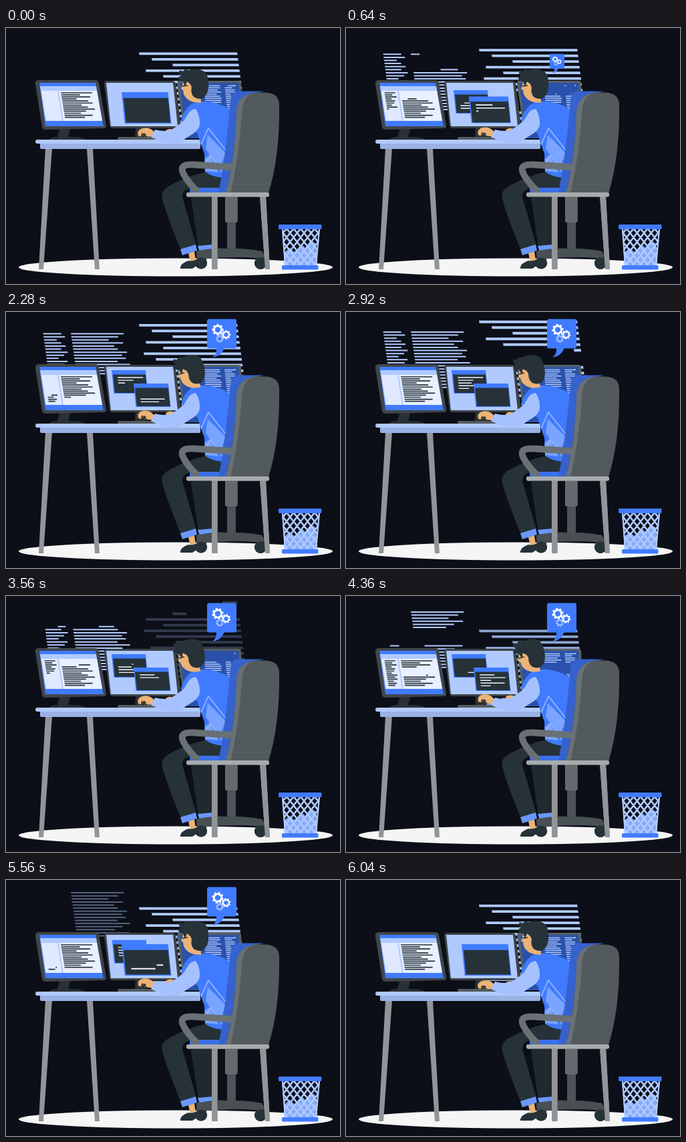
An HTML page with a canvas that plays this animation: 500 px wide and 383 px high, repeating every 6.08 s.

```html
<!DOCTYPE html>
<html lang="en">
<head>
<meta charset="utf-8">
<title>Developer at work</title>
<style>
html, body { margin: 0; width: 100%; height: 100%; overflow: hidden; background: #0c0f17; }
canvas { display: block; width: 500px; height: 383px; }
</style>
</head>
<body>
<canvas id="stage" width="500" height="383"></canvas>
<script>
const ctx = document.getElementById('stage').getContext('2d');
const LOOP = 6080, HALF = 3040, TAU = Math.PI * 2;
const BG = '#0c0f17', BLUE = '#407bff', PALE = '#b0caff', INK = '#263238', SKIN = '#ebb376';

const clamp = v => Math.max(0, Math.min(1, v));
const ramp = (t, a, b) => clamp((t - a) / (b - a));
const ease = (t, a, b) => { const k = ramp(t, a, b); return k * k * (3 - 2 * k); };
const mix = (a, b, k) => a + (b - a) * k;

function shape(d, fill) { ctx.fillStyle = fill; ctx.fill(new Path2D(d)); }
function rect(x, y, w, h, fill, r = 0) {
  ctx.fillStyle = fill;
  ctx.beginPath();
  ctx.roundRect(x, y, w, h, r);
  ctx.fill();
}
function disc(x, y, rx, ry, fill) {
  ctx.fillStyle = fill;
  ctx.beginPath();
  ctx.ellipse(x, y, rx, ry, 0, 0, TAU);
  ctx.fill();
}
function line(d, stroke, width) {
  ctx.strokeStyle = stroke;
  ctx.lineWidth = width;
  ctx.stroke(new Path2D(d));
}

// One slanted row of code: [0, typed] and [erased, 1] stay visible.
function codeRow(x, y, len, h, typed, erased, fill) {
  const slant = h * 0.2;
  const part = (a, b) => {
    if (b - a < 0.01) return;
    const l = x + len * a, r = x + len * b;
    ctx.beginPath();
    ctx.moveTo(l, y - h / 2);
    ctx.lineTo(r, y - h / 2);
    ctx.lineTo(r + slant, y + h / 2);
    ctx.lineTo(l + slant, y + h / 2);
    ctx.fill();
  };
  ctx.fillStyle = fill;
  if (typed >= erased) part(0, 1);
  else { part(0, typed); part(erased, 1); }
}

// Rows with a gap running downward between the typing and erasing rows.
function codeBlock(o) {
  for (let i = 0; i < o.n; i++) {
    codeRow(o.x + o.dx * i, o.y + o.dy * i, o.len[i % o.len.length], o.h,
      clamp(o.typed - i), clamp(o.erased - i), o.fill);
  }
}

const WIDE = [199, 218, 249, 209, 235, 206, 224, 254, 216, 228, 241, 212, 233, 205];
function rightCode(t) {
  const y = 38.4 - 0.0081 * (t < 3880 ? t : t - LOOP);
  const late = t > 2500;
  const typed = late ? 2.79 - (t - 3560) / 130 : 6 - (t - 1320) / 130;
  const erased = typed - 2.64;
  const idle = t > 3880;
  ctx.globalAlpha = idle ? ramp(t, 4040, 4440) : 1 - ramp(t, 3040, 3720);
  WIDE.forEach((x, i) => {
    codeRow(x, y + 8.5 * i, 346 + 1.1 * i - x, 3.8,
      idle ? 1 : clamp(i + 1 - typed), idle ? 1 : clamp(i + 1 - erased), PALE);
  });
  ctx.globalAlpha = 1;
}

function leftCode(t) {
  const u = t % HALF, y = 41.9 - 0.0041 * t;
  const erased = (u + 45) / 122, typed = (u - 620) / 122;
  ctx.globalAlpha = ramp(t, 80, 480) * (1 - ramp(t, 5200, 5840));
  codeBlock({ n: 19, x: 55.5, dx: 0.62, y, dy: 4.6, h: 2, fill: PALE,
    len: [27, 32, 19, 25, 31, 24, 33, 27, 18, 31, 26, 17],
    typed: t < HALF ? 99 : 0, erased: t < HALF ? 0 : (t - 2995) / 122 });
  codeBlock({ n: 19, x: 97, dx: 0.65, y, dy: 4.6, h: 2, fill: PALE,
    len: [79, 70, 55, 76, 62, 67, 80, 72, 77, 64, 82, 70, 58], typed, erased });
  ctx.globalAlpha = 1;
}

function screenOne(u) {
  shape('M81 149H97L93 163Q117 163 118 167H64Q67 163 77 163Z', '#293134');
  shape('M48 78H133Q138 78 139 82L150 145Q151 150 146 150L60 152Q55 152 54 148L44 84Q43 79 48 78Z', '#40464a');
  shape('M50 82H134L146 147H59Z', BLUE);
  shape('M51 87H135L144 139H59Z', PALE);
  shape('M53 94H77L84 139H60Z', '#e0e9ff');
  shape('M79 94H136L144 139H86Z', '#e9f0ff');
  const common = { n: 13, dx: 0.5, y: 97, dy: 3.05, h: 1.7, fill: INK };
  const erasing = u > 1370;
  codeBlock({ ...common, x: 57.5, len: [16, 11, 17, 9, 14, 12, 8, 16, 12, 15, 9, 13, 10],
    typed: erasing ? 0 : u / 78, erased: erasing ? (u - 1370) / 97 : 99 });
  codeBlock({ ...common, x: 82, len: [47, 28, 43, 22, 39, 45, 28, 37, 47, 33, 25, 42, 30],
    typed: (u - 720) / 150, erased: (u - 130) / 150 });
}

function win(x, y, w, k, text) {
  ctx.save();
  ctx.translate(x, y);
  ctx.transform(k, 0, 0.1 * k, k, 0, 0);
  rect(0, 0, w, 35, BLUE);
  rect(1.5, 6.5, w - 2.2, 27.5, INK);
  codeBlock({ x: 8, dx: 0, y: 11, dy: 4.1, h: 1.4, fill: '#f2f5ff', n: 5, ...text });
  ctx.restore();
}

function screenTwo(t, u) {
  shape('M194 149H208L211 164H193Z', '#293134');
  shape('M151 79H249Q253 79 254 83L262 146Q262 150 258 150H160Q156 150 155 146L147 84Q147 79 151 79Z', '#3c4347');
  shape('M150 82H250L257 147H157Z', PALE);
  const q = t < 3000 ? 1 - ramp(t, 150, 900) : ramp(t, 5480, 5960);
  const big = t < 3000 ? 1 - ease(t, 300, 900) : ease(t, 4700, 5300);
  win(158 + 24 * q * q, 87 + 17 * q, 51, 1, { len: [38, 23, 20, 27, 24],
    typed: (u - 1530) / 300, erased: (u + 50) / 300 });
  const erasing = u > 1380;
  win(mix(191, 173, big), mix(107, 96, big), 52, mix(1, 1.34, big), { len: [22, 38, 16, 36, 27],
    typed: erasing ? 0 : (u - 20) / 286, erased: erasing ? (u - 1380) / 300 : 99 });
  rect(167, 163, 74, 4, '#555c5f', 2);
}

function screenThree(u) {
  shape('M257 79H348Q352 79 352 83L356 165H268L256 84Z', '#596064');
  shape('M260 82H348L353 165H270Z', '#2a52ac');
  disc(343, 86, 1, 1, PALE);
  const wave = { n: 13, y: 86.5, dy: 3.1, h: 1.5, typed: (u - 620) / 140, erased: (u + 45) / 140 };
  codeBlock({ ...wave, x: 296, dx: 0.3, len: [24, 24, 20, 25, 18, 23, 25], fill: PALE });
  codeBlock({ ...wave, x: 327, dx: 0.35, len: [16, 11, 15, 17, 8, 14], fill: PALE });
}

function desk() {
  shape('M59 180H69L56 361H49Z', '#919598');
  shape('M121 180H130L140 361H133Z', '#919598');
  rect(51, 171, 240, 10, '#9ab1e4', 2);
  rect(44, 167, 248, 6, PALE, 3);
}

function basket() {
  const body = new Path2D('M413 300H470L465 356H417Z');
  ctx.save();
  ctx.clip(body);
  shape('M416 336L425 329L431 335L438 331L444 325L448 329L456 318L463 322L468 356H416Z', '#86abfa');
  ctx.strokeStyle = PALE;
  ctx.lineWidth = 2.6;
  ctx.beginPath();
  for (let x = 441 - 84; x < 530; x += 10.5) {
    ctx.moveTo(x, 300); ctx.lineTo(x + 44, 356);
    ctx.moveTo(x, 300); ctx.lineTo(x - 44, 356);
  }
  ctx.stroke();
  ctx.restore();
  line('M414 300L418 356M469 300L464 356', PALE, 2.2);
  rect(408, 294, 64.5, 7, BLUE, 1.5);
  rect(413, 355, 54.5, 6.5, BLUE, 1.5);
}

function legs() {
  shape('M276 248H309V327L288 329Z', '#20292e');
  shape('M287 326L309 324L312 332L290 335Z', '#6a98ff');
  shape('M273 337L282 334L284 348L276 350Z', SKIN);
  shape('M261 358Q262 352 273 348Q281 350 288 344L300 345V354L285 356L279 360H263Q260 360 261 358Z', INK);
  shape('M300 215Q312 221 325 221L320 240H278Q264 241 264 253L285 326L262 333Q239 276 234 256Q230 242 249 234Q270 222 300 215Z', INK);
  shape('M261 331L284 324L286 333L264 340Z', '#6a98ff');
}

function torso() {
  const vest = 'M262 138Q265 124 277 114Q287 109 304 110Q325 114 338 124L343 150L324 224Q307 222 298 215L297 188Q290 170 287 158L262 140Z';
  shape(vest, BLUE);
  ctx.save();
  ctx.clip(new Path2D(vest));
  shape('M302 160L329 187L320 210L299 181Z', '#7aa4ff');
  shape('M296 197L305 190L318 216L298 214Z', '#7aa4ff');
  line('M290 179L303 150L334 189M297 207L306 191L324 216', '#93b5ff', 1.8);
  ctx.restore();
}

function head(t) {
  const k = ease(t, 1200, 1900) - ease(t, 4480, 5300);
  ctx.save();
  ctx.translate(290 - k, 110 + k);
  ctx.rotate(-0.19 * k);
  ctx.translate(-290, -110);
  shape('M266 75L264 86L262 91L265 93L266 99Q270 108 281 111L292 112L290 78Z', SKIN);
  shape('M260 63L265 65Q267 60 273 63Q288 59 298 66Q304 72 303 89Q302 101 293 106Q281 107 278 98L276 84L271 80L268 88L265 80Q257 79 258 74L262 71Q257 68 260 63Z', INK);
  disc(274, 90, 3.8, 6.2, SKIN);
  line('M264 87L272 86', INK, 1.5);
  ctx.restore();
}

function arms(u) {
  const lift = 0.5 - 0.5 * Math.cos(TAU * (u / 304 - 0.87));
  disc(246, 155 - 3 * lift, 7, 3.6, SKIN);
  shape('M239 157Q251 151 266 139L273 149L264 160L245 161Z', '#9dbcff');
  ctx.save();
  ctx.translate(224, 160 - lift);
  ctx.rotate(0.12 * lift);
  shape('M1 3Q-1 -7 -12 -10Q-24 -11 -27 -3L-26 2L-22 3L-21 -2L-16 -2L-13 3Z', SKIN);
  line('M-20 2L-18 -3M-16 3L-14 -2', '#b88658', 0.8);
  ctx.restore();
  shape('M271 131Q275 122 284 121Q291 132 290 145Q288 154 277 160Q268 165 262 171Q255 173 243 172.5Q232 171 217 163L223 152Q238 156 248 152Q264 145 271 131Z', '#a5c2ff');
}

function chair() {
  rect(275, 239, 60, 8, '#3b70e8', 3);
  shape('M345 94.5H387L374 97Q346 99 345 126Q343 192 329 247H318Q329 190 336 109Q337 96 345 94.5Z', '#3662ce');
  shape('M374 96.5Q346 99 345 126Q343 192 329 247H344L367 110L385 97Z', '#697174');
  shape('M374 96.5H388Q409 97 409 116Q410 192 393 247H336Q349 192 353 128Q354 99 374 96.5Z', '#535a5d');
  ctx.lineCap = 'round';
  line('M336 208L282 204.5Q261 203 264 214Q268 226 285 243', '#697174', 9.8);
  ctx.lineCap = 'butt';
}

function chairBase() {
  rect(331, 286, 13, 50, '#4d5457');
  rect(328, 250, 18.5, 41, '#646b6e', 3);
  shape('M285 334Q306 329 331 330H346Q369 331 383 334Q387 339 385 346Q365 342 339 343Q312 343 286 346Z', '#485054');
  disc(292, 352, 9, 8.5, INK);
  disc(381, 352, 9, 9, INK);
  rect(308, 250, 8.5, 111, '#919598');
  shape('M380 251H389L395 361H388Z', '#919598');
  rect(270, 246, 124, 6.5, '#a8acae', 3);
}

function gear(x, y, r, hole, turn, fill) {
  ctx.save();
  ctx.translate(x, y);
  ctx.rotate(turn);
  ctx.fillStyle = fill;
  ctx.beginPath();
  ctx.arc(0, 0, r * 0.8, 0, TAU);
  ctx.moveTo(hole, 0);
  ctx.arc(0, 0, hole, 0, TAU, true);
  ctx.fill();
  for (let i = 0; i < 8; i++) {
    ctx.rotate(TAU / 8);
    ctx.fillRect(-r * 0.18, -r, r * 0.36, r * 0.35);
  }
  ctx.restore();
}

function bubble(t) {
  const k = ease(t, 500, 780) - ease(t, 5760, 6020);
  if (k <= 0) return;
  ctx.save();
  ctx.translate(309, 67);
  ctx.scale(k, k);
  ctx.translate(-309, -67);
  rect(301, 10.5, 44, 44, BLUE, 3);
  shape('M315 53Q316 63 309 68Q323 66 327 53Z', BLUE);
  const turn = t / LOOP * TAU;
  gear(317, 26.5, 8.6, 4.2, turn, '#fff');
  gear(329.5, 34, 6.8, 3.2, -turn, '#fff');
  gear(320, 40, 5.8, 2.8, turn, '#a6c4ff');
  ctx.restore();
}

function draw(t) {
  const u = t % HALF;
  ctx.fillStyle = BG;
  ctx.fillRect(0, 0, 500, 383);
  disc(254, 358, 235, 13.5, '#f5f5f5');
  rightCode(t);
  leftCode(t);
  screenThree(u);
  screenTwo(t, u);
  screenOne(u);
  desk();
  basket();
  chairBase();
  legs();
  torso();
  head(t);
  arms(u);
  chair();
  chairBase();
  bubble(t);
}

const start = performance.now();
function tick() {
  const t = (performance.now() - start) % LOOP;
  draw(Math.floor(t / 40) * 40);
  requestAnimationFrame(tick);
}
tick();
</script>
</body>
</html>
```
